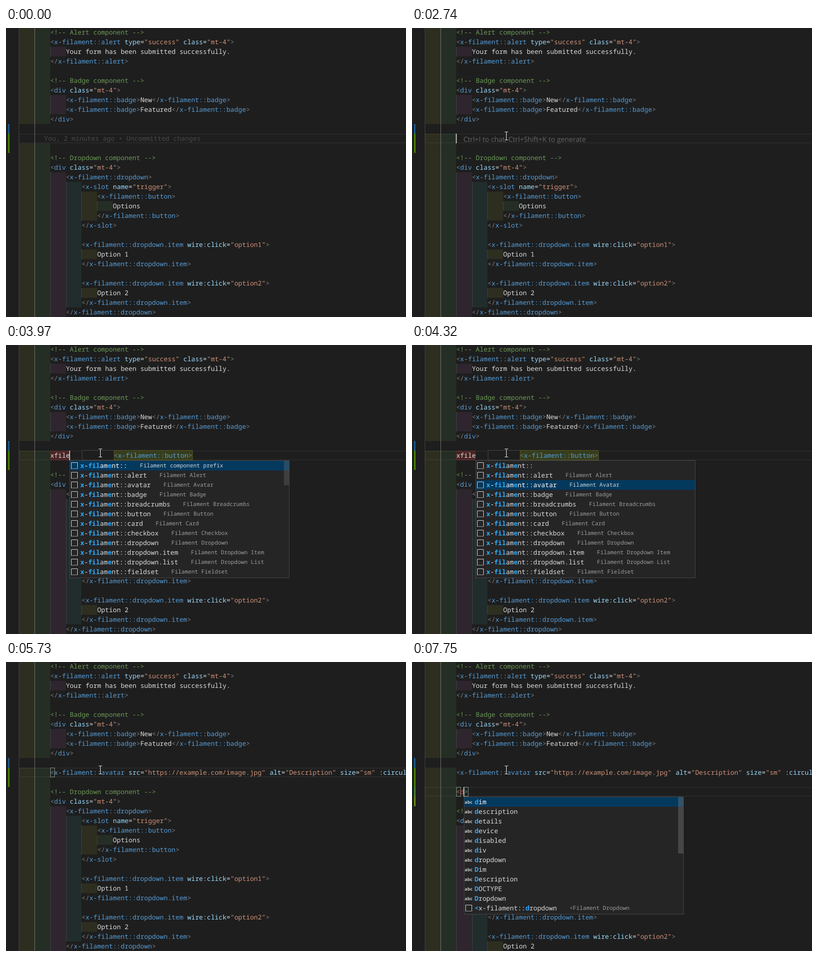
An HTML page for the animation above (8000 ms loop, 786 by 569 pixels).

```html
<!DOCTYPE html>
<html lang="en">
<head>
<meta charset="utf-8">
<title>Editor snippets</title>
<style>
html, body { margin: 0; width: 100%; height: 100%; overflow: hidden; background: #1e1e1e; }
svg { display: block; }
text { font: 12.828px "Noto Sans Mono", "DejaVu Sans Mono", monospace; text-rendering: geometricPrecision; white-space: pre; }
text.hint { font: 13.68px "Open Sans", "Noto Sans", sans-serif; }
text.note { font-size: 10.9px; }
text.abc { font: bold 8.6px "Open Sans", "Noto Sans", sans-serif; }
text.hit { font-weight: bold; }
rect { shape-rendering: crispEdges; }
</style>
</head>
<body>
<svg id="stage" width="786" height="569" viewBox="0 0 786 569"><g id="view"></g><g id="mouse">
<path d="M-3.5 .5H-1Q0 .5 0 2Q0 .5 1 .5H3.5M0 1.5V15M-3.5 16.5H-1Q0 16.5 0 15Q0 16.5 1 16.5H3.5" fill="none" stroke="#111" stroke-width="3"/>
<path d="M-3.5 .5H-1Q0 .5 0 2Q0 .5 1 .5H3.5M0 1.5V15M-3.5 16.5H-1Q0 16.5 0 15Q0 16.5 1 16.5H3.5" fill="none" stroke="#e8e8e8" stroke-width="1.2"/>
</g></svg>
<script>
const LOOP = 8000, LEFT = 25.3, CHAR = 7.697, ROW = 19;
const C = { comment: '#6a9955', punct: '#808080', tag: '#569cd6', attr: '#9cdcfe',
  string: '#ce9178', text: '#dcdcdc', hit: '#2aaaff', ghost: '#6a6a6a' };
const BANDS = ['255,255,64', '127,255,127', '255,127,255', '79,236,236'];

// [indent, code]
const HEAD = [
  [8, '<!-- Alert component -->'],
  [8, '<x-filament::alert type="success" class="mt-4">'],
  [12, 'Your form has been submitted successfully.'],
  [8, '</x-filament::alert>'],
  [8, ''],
  [8, '<!-- Badge component -->'],
  [8, '<div class="mt-4">'],
  [12, '<x-filament::badge>New</x-filament::badge>'],
  [12, '<x-filament::badge>Featured</x-filament::badge>'],
  [8, '</div>'],
  [0, '']
];
const option = n => [
  [16, ''],
  [16, `<x-filament::dropdown.item wire:click="option${n}">`],
  [20, 'Option ' + n],
  [16, '</x-filament::dropdown.item>']
];
const TAIL = [
  [8, ''],
  [8, '<!-- Dropdown component -->'],
  [8, '<div class="mt-4">'],
  [12, '<x-filament::dropdown>'],
  [16, '<x-slot name="trigger">'],
  [20, '<x-filament::button>'],
  [24, 'Options'],
  [20, '</x-filament::button>'],
  [16, '</x-slot>'],
  ...option(1), ...option(2),
  [12, '</x-filament::dropdown>']
];
const AVATAR = '<x-filament::avatar src="https://example.com/image.jpg" alt="Description" size="sm" :circular="true" />';
const PARTS = 'alert avatar badge breadcrumbs button card checkbox dropdown dropdown.item dropdown.list fieldset'.split(' ');
const WORDS = 'dim description details device disabled div dropdown Dim Description DOCTYPE Dropdown'.split(' ');

// [time, column, row]; no column means hidden
const CARET = [[0], [570, 0, 11], [1070], [1470, 0, 11], [1540, 4, 11], [1870, 8, 11], [2010, 12, 11],
  [2540], [2740, 8, 11], [3080, 9, 11], [3350, 10, 11], [3480, 11, 11], [3550, 12, 11], [3620, 13, 11],
  [4110], [4590, 62, 11], [5060], [5860, 8, 12], [6340, 8, 13], [6740, 9, 13], [7280], [7610, 10, 13]];
const HINT = [[0], [1070, 0, 11], [1540, 4, 11], [1870, 8, 11], [2010, 12, 11], [2740, 8, 11], [3080],
  [5930, 8, 12], [6340, 8, 13], [6740]];
const INDENT = [[0, 0], [1870, 8], [2010, 12], [2740, 8]];
const TYPED = [[0, 0], [3080, 1], [3350, 2], [3480, 3], [3550, 4], [3620, 5], [4590, 0]];
const PICK = [[0, 0], [4110, 1], [4320, 2]];

const at = (list, t) => list.filter(k => k[0] <= t).pop();
const colX = c => LEFT + c * CHAR;
const rowY = r => r * ROW - 1;
const esc = s => s.replace(/&/g, '&amp;').replace(/</g, '&lt;');
const rect = (x, y, w, h, fill, more = '') =>
  `<rect x="${x}" y="${y}" width="${w}" height="${h}" fill="${fill}" ${more}/>`;
const text = (x, y, s, fill, cls = '') =>
  `<text x="${x.toFixed(2)}" y="${y}" fill="${fill}" class="${cls}">${esc(s)}</text>`;
const frame = (x, y, w, h, stroke, fill = 'none') =>
  rect(x + .5, y + .5, w - 1, h - 1, fill, `stroke="${stroke}"`);

function code(x, y, s) {
  if (s.startsWith('<!--')) return text(x, y, s, C.comment);
  let out = '', mode = 'text';
  for (const m of s.matchAll(/<\/?|\/?>|"[^"]*"|=|[^\s<>="]+/g)) {
    const w = m[0];
    let color = C[mode];
    if (w[0] === '<') { color = C.punct; mode = 'tag'; }
    else if (w.endsWith('>')) { color = C.punct; mode = 'text'; }
    else if (w[0] === '"') color = C.string;
    else if (w === '=') color = C.text;
    else if (mode === 'tag') mode = 'attr';
    out += text(x + m.index * CHAR, y, w, color);
  }
  return out;
}

function indent(n, r) {
  let out = '';
  for (let i = 0; i < n / 4; i++) {
    const x = Math.round(colX(i * 4));
    out += rect(x, rowY(r), Math.round(colX(i * 4 + 4)) - x, ROW, `rgba(${BANDS[i % 4]},.07)`);
  }
  for (let i = 0; i < Math.max(2, n / 4); i++)
    out += rect(Math.round(colX(i * 4)), rowY(r), 1, ROW, i === 1 ? '#707070' : '#404040');
  return out;
}

const bracket = (c, r) =>
  frame(Math.round(colX(c)), rowY(r), 9, ROW, '#888', 'rgba(0,100,0,.1)');

function label(x, y, s, hits, color) {
  let out = '';
  for (const run of s.matchAll(/./g)) {
    const hit = hits.includes(run.index);
    out += text(x + run.index * CHAR, y, run[0], hit ? C.hit : color, hit ? 'hit' : '');
  }
  return out;
}

const boxIcon = (x, y) =>
  `<path d="M${x + .5} ${y + 12}V${y + .5}H${x + 12.5}V${y + 12}" fill="none" stroke="#d0d0d0"/>` +
  `<path d="M${x} ${y + 12.5}H${x + 13}" stroke="#d0d0d0" stroke-dasharray="2 1"/>`;

// items: { name, note, hits, word }
function popup(x, y, items, pick, barH, barAlpha) {
  let out = frame(x, y, 432, 232, '#454545', '#252526');
  items.forEach((it, i) => {
    const top = y + 1 + i * ROW, on = i === pick, base = top + 14;
    if (on) out += rect(x + 1, top, 430, ROW, '#04395e');
    out += it.word ? text(x + 1.5, top + 13, 'abc', '#cccccc', 'abc') : boxIcon(x + 3, top + 3);
    out += label(x + 21, base, it.name, it.hits, on ? '#ffffff' : C.text);
    if (it.note && (on || !it.focusOnly))
      out += text(x + 46 + it.name.length * CHAR, base - 1, it.note, on ? '#d0d8de' : '#9d9d9d', 'note');
  });
  return out + rect(x + 421, y + 1, 10, barH, '#797979', `opacity="${(.4 * barAlpha).toFixed(3)}"`);
}

const title = s => 'Filament ' + s.split('.').map(w => w[0].toUpperCase() + w.slice(1)).join(' ');

function componentList(t, n) {
  const hits = [0, 2, 3, 4, 7].slice(0, n);
  const items = [{ name: 'x-filament::', note: 'Filament component prefix', hits, focusOnly: true }]
    .concat(PARTS.map(p => ({ name: 'x-filament::' + p, note: title(p), hits })));
  const alpha = Math.max(0, Math.min(1, (4180 - t) / 280));
  return popup(Math.round(colX(8 + n)), 227, items, at(PICK, t)[1], 48, alpha);
}

function wordList() {
  const items = WORDS.map(name => ({ name, hits: [0], word: true }));
  items.push({ name: '<x-filament::dropdown', note: '<Filament Dropdown', hits: [0, 13] });
  return popup(102, 265, items, 0, 111, 1);
}

function suggestion() {
  return rect(87, 208, 38, ROW, 'rgba(255,60,60,.2)') +
    frame(149, 207, 64, 20, '#454545', '#1e1e1e') +
    frame(212, 207, 155, 20, '#55552c', '#373d1c') + code(212, 222, '<x-filament::button>');
}

function gutter(added) {
  let out = '';
  for (let y = 189; y < 208; y += 2)
    out += rect(4, y, 2, 1, '#1b81d8') + rect(5, y + 1, 2, 1, '#1764a6');
  out += rect(4, 208, 3, 38, '#487e02');
  if (added > 0) out += rect(4, 246, 3, ROW, '#43803a');
  if (added > 1) out += rect(4, 265, 3, ROW, '#67891c');
  return out;
}

function view(t) {
  const added = t < 5860 ? 0 : t < 6340 ? 1 : 2;
  const typed = at(TYPED, t)[1], done = t >= 4590, row = 11 + added;
  const extra = Array.from({ length: added }, () => [8, '']);
  const line = done ? AVATAR : 'xfile'.slice(0, typed);
  const rows = [...HEAD, [at(INDENT, t)[1], line], ...extra, ...TAIL].slice(0, 30);

  let out = rect(0, 0, 786, 569, '#1e1e1e');
  out += rect(26, rowY(row) + 1, 800, ROW - 2, 'none', 'stroke="#282828" stroke-width="2"');
  rows.forEach(([n], r) => out += indent(n, r));
  out += gutter(added);

  if (done && t < 5590) {
    out += rect(279, 208, 223, ROW, '#264f78');
    for (const word of ['Description', 'sm', 'true'])
      out += rect(colX(8 + AVATAR.indexOf(word)), 208, word.length * CHAR, ROW, 'rgba(124,124,124,.3)');
  }
  if (t >= 5590 && t < 5860) out += bracket(8, 11);
  if (t >= 3970 && !done) out += suggestion();
  rows.forEach(([n, s], r) => out += code(colX(n), rowY(r) + 14, s));

  if (t < 940) out += text(75, 222, 'You, 2 minutes ago • Uncommitted changes', '#494949');
  const [, hc, hr] = at(HINT, t);
  if (hr) out += text(colX(hc) + 14, rowY(hr) + 16, 'Ctrl+I to chat, Ctrl+Shift+K to generate', '#676767', 'hint');

  if (t >= 6740) {
    const y = rowY(13) + 14, d = t >= 7610, ghost = t >= 7080 && !d;
    const end = d ? 10 : ghost ? 27 : 9;
    out += bracket(8, 13) + bracket(end, 13) + text(colX(8), y, '<', C.punct) + text(colX(end), y, '>', C.punct);
    if (d) out += text(colX(9), y, 'd', '#d0504c');
    if (ghost) out += text(colX(9), y, 'x-filament::button', C.ghost);
  }

  const [, cc, cr] = at(CARET, t);
  if (cr) out += rect(Math.round(colX(cc)) - 1, rowY(cr), 2, ROW, '#aeafad');
  if (t >= 3150 && !done) out += componentList(t, typed);
  if (t >= 7750) out += wordList();
  return out;
}

const viewEl = document.getElementById('view'), mouse = document.getElementById('mouse');
let last = '';

function draw(t) {
  const html = view(t);
  if (html !== last) viewEl.innerHTML = last = html;
  const k = Math.max(0, Math.min(1, (t - 70) / 570)), e = k * k * (3 - 2 * k);
  const lift = t >= 940 && t < 1070 ? 5 : 0;
  mouse.setAttribute('transform', `translate(${(394.5 - 209 * e).toFixed(1)} ${(455 - 251 * e - lift).toFixed(1)})`);
  mouse.setAttribute('visibility', t < 70 ? 'hidden' : 'visible');
}

const start = performance.now();
function tick() {
  draw((performance.now() - start) % LOOP);
  requestAnimationFrame(tick);
}
tick();
</script>
</body>
</html>
```
